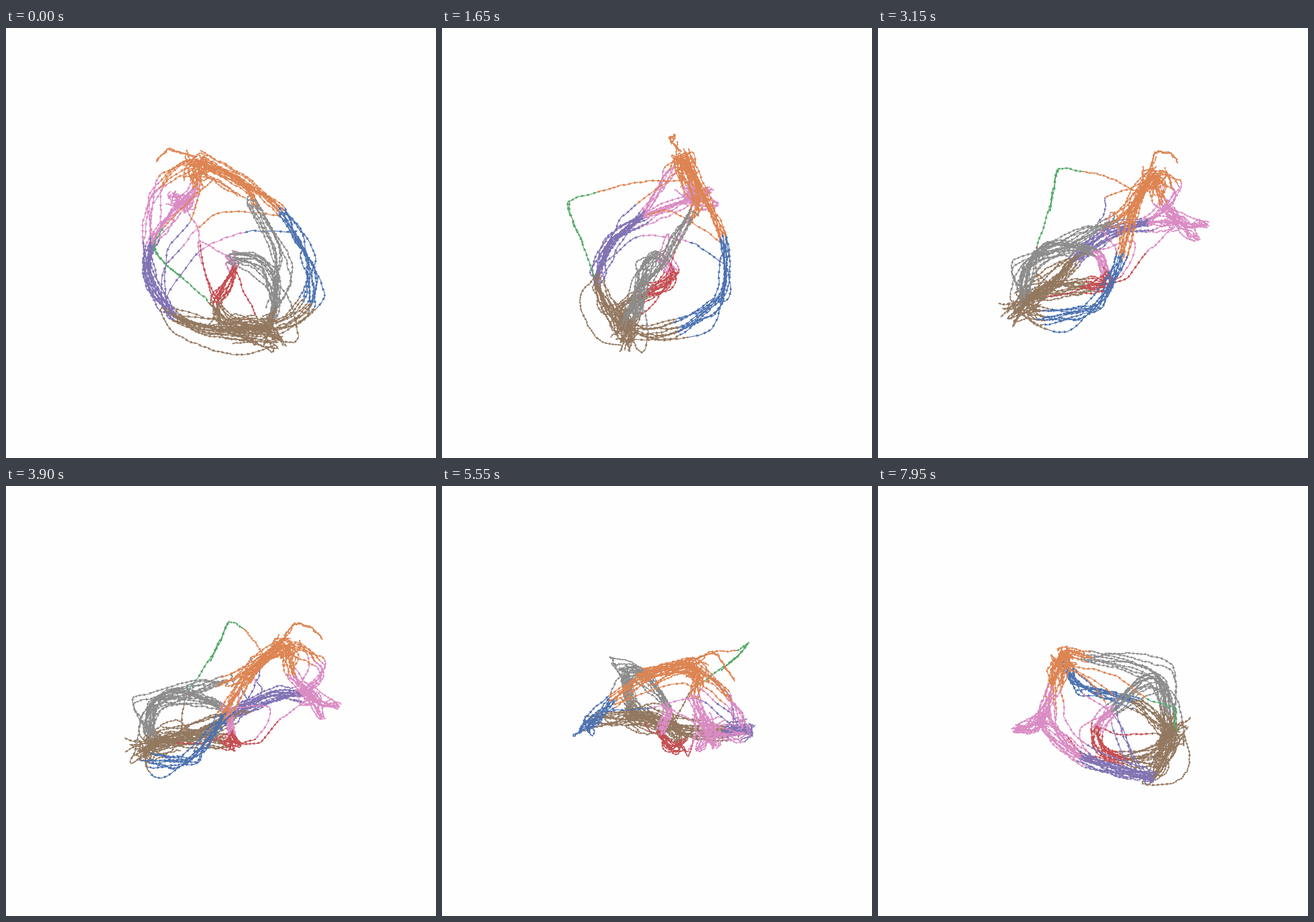
Animation, 748 px wide and 748 px high, one loop 8 s. Source, as an HTML page with a canvas:

```html
<!DOCTYPE html>
<html lang="en">
<head>
<meta charset="utf-8">
<title>Rotating trajectories</title>
<style>
  html, body { margin: 0; width: 100%; height: 100%; overflow: hidden; background: #fefefe; }
  canvas { display: block; }
</style>
</head>
<body>
<canvas width="748" height="748"></canvas>
<script>
const ctx = document.querySelector('canvas').getContext('2d');
const LOOP = 8000, HOLD = 150, TURN = 5 * Math.PI / 180;
const CX = 390, CY = 400, TILT = 0.5;
const colours = {
  blue: '#4c72b0', orange: '#dd8452', green: '#55a868', red: '#c44e52',
  purple: '#8172b3', brown: '#937860', pink: '#da8bc3', gray: '#8c8c8c'
};
const steps = Object.fromEntries(Object.keys(colours).map(name => [name, []]));

let seed = 20;
const rand = () => (seed = (seed * 16807) % 2147483647) / 2147483647;
const noise = () => (rand() + rand() + rand() - 1.5) * 1.6;
const noise3 = size => [noise() * size, noise() * size, noise() * size];

const spline = (a, b, c, d, t) =>
  b + t / 2 * (c - a + t * (2 * a - 5 * b + 4 * c - d + t * (3 * (b - c) + d - a)));

// Waypoints are [right, towards viewer, up, spread factor]; a colour name applies from the next waypoint on.
function route(copies, spread, step, ...parts) {
  const points = [], names = [];
  let name;
  for (const part of parts) {
    if (typeof part === 'string') name = part;
    else { points.push(part); names.push(name); }
  }
  for (let n = 0; n < copies; n++) {
    const shift = noise3(spread * 0.75);
    const way = points.map(p => {
      const own = noise3(spread * 0.7), k = p[3] ?? 1;
      return [0, 1, 2].map(i => p[i] + (shift[i] + own[i]) * k);
    });
    let last = way[0];
    for (let i = 0; i < way.length - 1; i++) {
      const a = way[Math.max(i - 1, 0)], b = way[i], c = way[i + 1], d = way[Math.min(i + 2, way.length - 1)];
      const count = Math.max(2, Math.round(Math.hypot(c[0] - b[0], c[1] - b[1], c[2] - b[2]) / step));
      for (let j = 1; j <= count; j++) {
        const shake = noise3(1.1);
        const next = [0, 1, 2].map(k => spline(a[k], b[k], c[k], d[k], j / count) + shake[k]);
        steps[names[i]].push([last, next]);
        last = next;
      }
    }
  }
}

const hub = [45, 122, -65, 1.4], crown = [-50, -76, 130], knot = [-82, -115, 38];
const left = [-140, 14, -23], leftLow = [-110, 69, -55], front = [-40, 98, -72, 1.2];
const gate = [42, -20, 80], bend = [75, 108, 14], core = [0, 15, 8, 0.6];
const redEnd = [-22, 33, -63];

// right side, up to the crown
route(9, 7, 10, 'brown', hub, [95, 105, -62], 'blue', [135, 72, -49], [140, 4, -28], [133, -27, -13],
  [118, -43, 14], 'orange', [88, -59, 52], [22, -61, 102], crown);
route(1, 1, 11, 'brown', [60, 150, -75], 'blue', [150, 55, -60], [160, 10, -46], [135, -25, -10], [118, -43, 14]);
route(5, 12, 6, 'orange', [30, -58, 92], [-15, -62, 112], crown, [-60, -85, 105]);
route(6, 11, 5, 'orange', [-65, -72, 138], crown, [-30, -70, 118], [-58, -82, 118]);
route(2, 1.5, 4, 'orange', [-60, -72, 140], [-90, -72, 149], [-110, -95, 140], [-129, -102, 117]);

// crown, down the left side
route(6, 11, 10, 'orange', crown, [-85, -90, 112], 'pink', [-120, -95, 80], [-138, -85, 45],
  'purple', [-145, -52, 4], left, leftLow, 'brown', [-95, 80, -62], front, hub, [80, 150, -72]);
route(9, 9, 9, 'orange', crown, [-60, -85, 108], 'pink', [-58, -92, 85], knot, [-120, -85, 15],
  'purple', [-140, -49, 0], left, leftLow, 'brown', [-95, 80, -62], front, hub);
route(9, 9, 5, 'pink', [-66, -98, 58], knot, [-88, -130, 32], [-98, -150, 32, 0.6], [-98, -163, 32, 0.3]);
route(7, 9, 5, 'pink', [-95, -100, 42], knot, [-72, -135, 28], [-65, -155, 23, 0.4]);
route(1, 1, 8, 'brown', leftLow, [-122, 60, -62], [-90, 121, -75], [5, 153, -91], [80, 150, -75]);
route(8, 13, 5, 'brown', [-10, 105, -68], hub, [75, 138, -70], [50, 125, -60]);

// inner loop
route(12, 9, 8, 'brown', hub, 'gray', [75, 123, -39], bend, [50, 76, 33], 'pink', core,
  'red', [8, -10, -20, 0.7], [-5, -6, -48, 0.7], 'brown', redEnd, [-5, 92, -69], hub);
route(1, 1, 9, 'pink', core, [-54, -43, 6], 'red', [-40, -26, -48], 'brown', redEnd, front);
route(1, 1, 9, 'pink', knot, [-58, -85, 10], 'red', [-52, -66, -8], [-40, -26, -55], 'brown', redEnd, hub);
route(1, 1, 10, 'red', [8, -10, -20], [25, 30, -45], 'brown', [45, 85, -55], hub);

// back to the crown
route(6, 9, 9, 'gray', [75, 123, -39], [85, 112, 14], [80, 57, 47], gate, 'orange', gate,
  [22, -50, 98], crown);
route(2, 5, 8, 'gray', hub, [98, 132, 15], [95, 90, 45], [60, 20, 74], 'orange', gate, [22, -50, 98], crown);
route(1, 1, 7, 'brown', hub, [110, 130, -80], 'gray', [112, 118, -45], [95, 120, 0], bend);

// single strays
route(1, 0.5, 9, 'brown', [0, 115, -65], [-20, 125, -40], 'green', [-38, 127, -11], [-85, 119, 26],
  [-118, 118, 54], [-133, 115, 76], 'orange', [-115, 67, 85], [-70, 12, 106], [-30, -60, 106]);
route(1, 1, 8, 'green', [-85, 119, 26], [-118, 118, 54], [-133, 115, 76]);
route(1, 1, 13, 'blue', [118, -43, 26], 'pink', [25, -30, 30], 'purple', [-50, 20, 22],
  [-95, 45, -20], 'brown', leftLow, front);
route(1, 1, 12, 'orange', [88, -59, 45], [-10, -24, 68], 'pink', [-55, 0, 50], 'purple', [-85, 12, 25],
  [-115, 25, -10], 'brown', leftLow, front);
route(1, 1, 12, 'orange', crown, [-55, -35, 98], 'purple', [-70, 12, 71], [-110, 25, 25], leftLow);

function draw(angle) {
  const cos = Math.cos(angle), sin = Math.sin(angle);
  const depth = p => p[0] * sin + p[1] * cos;
  const project = p => [CX + p[0] * cos - p[1] * sin, CY - p[2] + TILT * depth(p)];
  const layers = Object.entries(steps).map(([name, list]) =>
    ({ name, list, near: list.reduce((sum, s) => sum + depth(s[0]), 0) / list.length }));
  layers.sort((a, b) => a.near - b.near);

  ctx.fillStyle = '#fefefe';
  ctx.fillRect(0, 0, 748, 748);
  ctx.lineWidth = 1.3;
  ctx.lineJoin = 'round';
  for (const { name, list } of layers) {
    const lines = new Path2D(), heads = new Path2D();
    for (const [from, to] of list) {
      const [x0, y0] = project(from), [x1, y1] = project(to);
      const len = Math.hypot(x1 - x0, y1 - y0) || 1;
      const size = Math.min(6, 2.5 + len * 0.4);
      const ux = (x1 - x0) / len * size, uy = (y1 - y0) / len * size;
      lines.moveTo(x0, y0);
      lines.lineTo(x1, y1);
      heads.moveTo(x1, y1);
      heads.lineTo(x1 - ux - uy * 0.4, y1 - uy + ux * 0.4);
      heads.lineTo(x1 - ux + uy * 0.4, y1 - uy - ux * 0.4);
      heads.closePath();
    }
    ctx.strokeStyle = ctx.fillStyle = colours[name];
    ctx.stroke(lines);
    ctx.fill(heads);
  }
}

let shown = -1;
function tick() {
  const step = Math.floor(performance.now() % LOOP / HOLD);
  if (step !== shown) draw((shown = step) * TURN);
  requestAnimationFrame(tick);
}
tick();
</script>
</body>
</html>
```
